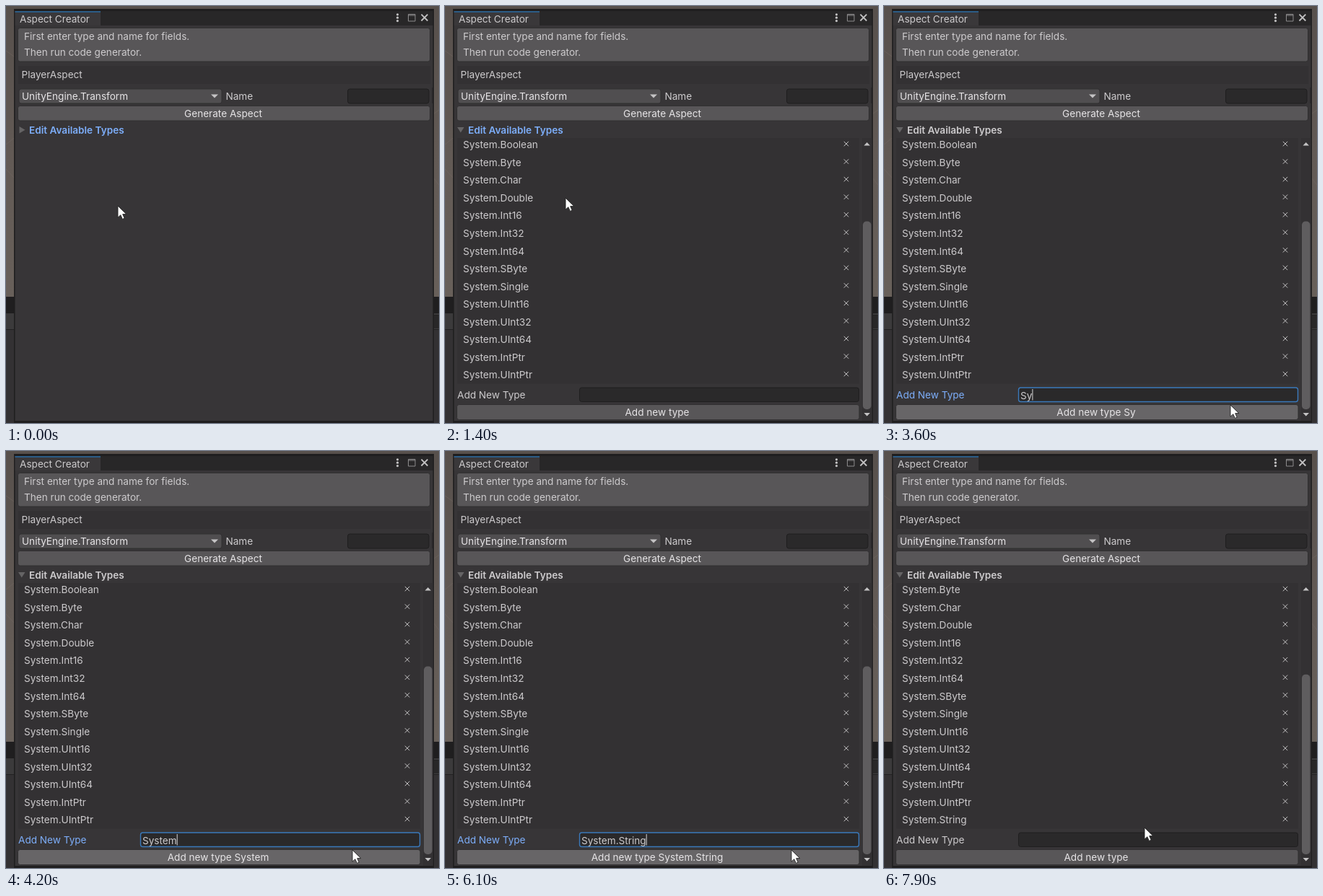
An HTML page for the animation above (8 s loop, 600 by 578 pixels).

```html
<!DOCTYPE html>
<html lang="en">
<head>
<meta charset="utf-8">
<title>Aspect Creator</title>
<style>
  html, body { margin: 0; width: 100%; height: 100%; overflow: hidden; background: #373537; }
  svg { display: block; width: 600px; height: 578px; }
  text { font: 13.6px Inter, sans-serif; fill: #cdcbcd; white-space: pre; }
  .bold { font-weight: 600; }
  .bright { fill: #e6e4e6; }
  .center { text-anchor: middle; }
  .button { fill: #585658; stroke: #313031; }
  .field { fill: #2a292a; stroke: #1f1e1f; }
  .panel { fill: #333133; }
  .icon { fill: none; stroke: #c4c3c4; }
  .arrow { fill: #c4c3c4; }
  .focus-text { fill: #7daefa; }
  .field.focused { stroke: #3a79bb; stroke-width: 1.4; }
  .button.hover { fill: #676567; }
</style>
</head>
<body>
<svg viewBox="0 0 600 578">
  <defs>
    <linearGradient id="ground" x2="0" y2="1">
      <stop offset="0" stop-color="#57504c"/>
      <stop offset=".5" stop-color="#625a55"/>
      <stop offset="1" stop-color="#68605a"/>
    </linearGradient>
    <clipPath id="viewport"><rect x="13" y="183" width="563" height="392"/></clipPath>
  </defs>

  <!-- Editor behind the window -->
  <rect width="600" height="404" fill="url(#ground)"/>
  <path d="M0 62l11 8M0 192l11-9M0 226l11 12M592 150l8 -6M592 238l8 10" stroke="#746b65" stroke-opacity=".5" fill="none"/>
  <rect y="403" width="600" height="23" fill="#1f1e1f"/>
  <rect y="426" width="600" height="22" fill="#3b3a3b"/>
  <rect x="592" y="428" width="8" height="18" fill="#282728"/>
  <rect y="448" width="600" height="130" fill="#333133"/>
  <path d="M0 448.5H600M592 428.5h8M592 446h8" stroke="#222122"/>

  <!-- Window -->
  <rect x="11" y="4" width="582" height="574" fill="#1f1e1f"/>
  <rect x="12.5" y="7" width="579" height="20" fill="#282728"/>
  <rect x="12.5" y="27" width="579" height="548" fill="#373537"/>
  <rect x="12.5" y="7" width="118.5" height="20" fill="#3a383a"/>
  <rect x="12.5" y="7" width="118.5" height="2" fill="#2c5d87"/>
  <text x="19" y="23">Aspect Creator</text>
  <g class="arrow"><circle cx="542.5" cy="11.8" r="1.6"/><circle cx="542.5" cy="16.2" r="1.6"/><circle cx="542.5" cy="20.6" r="1.6"/></g>
  <path class="icon" d="M557.5 11.5h9.5v9.5h-9.5zM557 13h10" style="stroke:#8c8b8c"/>
  <path class="icon" d="M575.5 11.7l8.8 8.8m0-8.8l-8.8 8.8" stroke-width="1.8"/>

  <rect class="button" x="16.5" y="30.5" width="571" height="46.5" rx="3"/>
  <text x="25" y="46.5">First enter type and name for fields.</text>
  <text x="25" y="69">Then run code generator.</text>
  <rect class="panel" x="17" y="83" width="571" height="25"/>
  <text x="21.5" y="100">PlayerAspect</text>
  <rect class="button" x="18" y="115" width="281" height="20" rx="3" style="fill:#504e50"/>
  <text class="bright" x="22" y="129.6">UnityEngine.Transform</text>
  <path class="arrow" d="M284 122.5h10l-5 5z"/>
  <text x="304.5" y="130">Name</text>
  <rect class="field" x="473.5" y="115" width="112.5" height="20" rx="3"/>
  <path d="M591 113v22" stroke="#222122"/>
  <rect class="button" x="16.5" y="138.5" width="571" height="20.5" rx="3"/>
  <text class="center bright" x="301" y="153.6">Generate Aspect</text>

  <rect id="rowHover" x="13" y="162" width="575.5" height="20" fill="#424043"/>
  <path id="foldArrow" fill="#656465"/>
  <text id="foldLabel" class="bold" x="32" y="177">Edit Available Types</text>

  <g id="list">
    <g clip-path="url(#viewport)">
      <g id="content">
        <rect id="listPanel" class="panel" x="17" y="185" width="557"/>
        <g id="rows"></g>
        <g id="footer">
          <text id="addLabel" x="17" y="0">Add New Type</text>
          <rect id="addField" class="field" x="186.5" y="-14.5" width="387" height="19.5" rx="3"/>
          <text id="typed" x="189" y="1"></text>
          <path id="caret" d="M0 -12.5v15.5" stroke="#d4d4d4"/>
          <rect id="addButton" class="button" x="16.5" y="9" width="557.5" height="21" rx="3"/>
          <text id="addText" class="center bright" x="294" y="24.4"></text>
        </g>
      </g>
    </g>
    <rect x="578" y="183" width="13.5" height="392" fill="#333133"/>
    <path class="arrow" d="M580.5 193.5h8.5l-4.25-4.5zM580.5 564h8.5l-4.25 4.5z"/>
    <rect id="thumb" x="579" width="11.5" rx="5" fill="#5f5d5f"/>
  </g>

  <path id="pointer" d="M0 0V16.2L3.8 12.7L6.4 18.4L9.2 17.2L6.7 11.6H11.8Z" fill="#fff" stroke="#222" stroke-width=".9"/>
</svg>

<script>
  const LOOP = 8000, STEP = 100;
  const OPEN = 1000, FOCUS = 2200, HOVER = 2400, ADD = 7200;
  const ROW = 24.54, FIRST = 204.3, TRACK_TOP = 196, TRACK = 363, VIEW = 392;
  const types = [
    ...["Transform", "GameObject", "Rigidbody", "Collider", "Vector3", "Quaternion"].map(n => "UnityEngine." + n),
    ..."Boolean Byte Char Double Int16 Int32 Int64 SByte Single UInt16 UInt32 UInt64 IntPtr UIntPtr String"
      .split(" ").map(n => "System." + n)
  ];
  const newType = "System.String";
  const keyTimes = [3300, 3500, 3800, 3900, 4000, 4200, 4800, 5200, 5500, 5700, 6000, 6000, 6100];

  // Pointer stops: time, x, y
  const stops = [
    [0, 155, 277], [900, 23, 171], [1000, 23, 171], [1400, 167, 266],
    [2100, 455, 534], [2500, 480, 553], [6600, 480, 553],
    [7000, 414, 558], [7200, 414, 558], [7900, 361, 522]
  ];

  const el = Object.fromEntries([...document.querySelectorAll("[id]")].map(e => [e.id, e]));
  const show = (e, on) => e.style.display = on ? "" : "none";
  const ramp = (t, a, b) => Math.min(1, Math.max(0, (t - a) / (b - a)));
  const smooth = u => u * u * (3 - 2 * u);
  const maxScroll = count => 154.2 + (count - 20) * ROW;

  el.rows.innerHTML = types.map((name, i) => {
    const y = FIRST + ROW * i;
    return `<g><text x="25" y="${y}">${name}</text>
      <path class="icon" d="M552.8 ${y - 9.5}l6.4 6.4m0 -6.4l-6.4 6.4"/></g>`;
  }).join("");

  function pointerAt(t) {
    const next = stops.findIndex(s => s[0] > t);
    if (next < 0) return stops.at(-1).slice(1);
    const [t0, x0, y0] = stops[next - 1], [t1, x1, y1] = stops[next];
    const u = smooth(ramp(t, t0, t1));
    return [x0 + (x1 - x0) * u, y0 + (y1 - y0) * u];
  }

  function drawList(t) {
    const count = t < ADD ? 20 : 21;
    const scroll = maxScroll(20) * smooth(ramp(t, 1100, 1400)) + ROW * ramp(t, 7400, 7700);
    const focused = t >= FOCUS && t < ADD;
    const text = focused ? newType.slice(0, keyTimes.filter(k => k <= t).length) : "";

    el.content.setAttribute("transform", `translate(0 ${-scroll})`);
    el.footer.setAttribute("transform", `translate(0 ${FIRST + ROW * count + 2.6})`);
    el.listPanel.setAttribute("height", ROW * count + 2);
    show(el.rows.lastElementChild, count === 21);

    el.addLabel.classList.toggle("focus-text", focused);
    el.addField.classList.toggle("focused", focused);
    el.addButton.classList.toggle("hover", t >= HOVER && t < ADD);
    el.typed.textContent = text;
    el.addText.textContent = ("Add new type " + text).trim();
    show(el.caret, focused);
    el.caret.setAttribute("transform", `translate(${189.5 + (text ? el.typed.getComputedTextLength() : 0)} 0)`);

    const total = VIEW + maxScroll(count);
    el.thumb.setAttribute("y", TRACK_TOP + TRACK * scroll / total);
    el.thumb.setAttribute("height", TRACK * VIEW / total);
  }

  function render(t) {
    const open = t >= OPEN;
    const [x, y] = pointerAt(t);
    el.pointer.setAttribute("transform", `translate(${x} ${y})`);
    show(el.rowHover, y >= 162 && y < 182 && !open);
    el.foldArrow.setAttribute("d", open ? "M17 168h9.5l-4.75 7.5z" : "M18.5 167v9.5l8 -4.75z");
    el.foldLabel.classList.toggle("focus-text", t < FOCUS);
    show(el.list, open);
    if (open) drawList(t);
  }

  const start = performance.now();
  function tick() {
    const t = (performance.now() - start) % LOOP;
    render(Math.floor(t / STEP) * STEP);
    requestAnimationFrame(tick);
  }
  tick();
</script>
</body>
</html>
```
